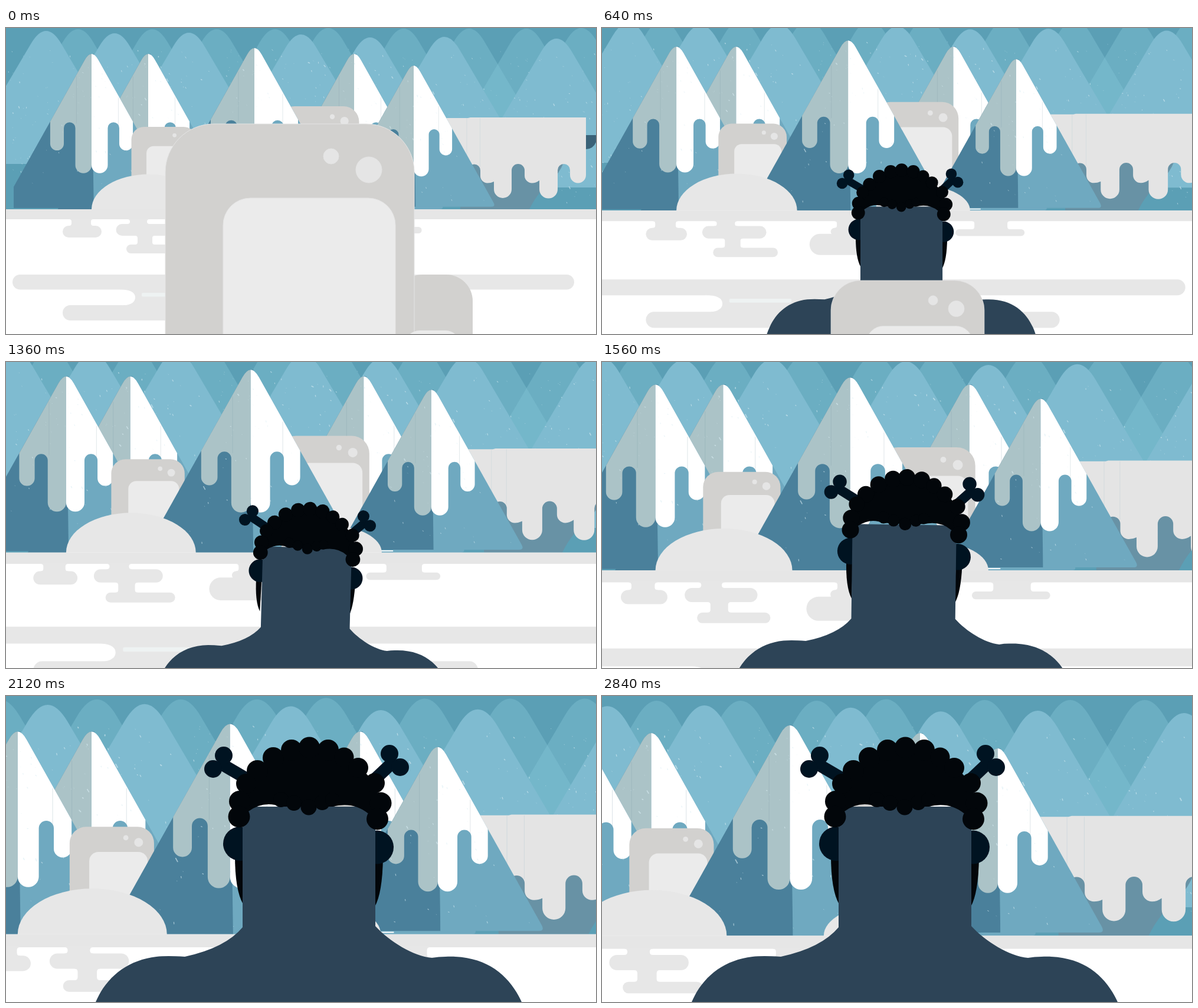
An HTML page that plays this animation: 1000x520 px, repeating every 2.88 s.

```html
<!DOCTYPE html>
<html lang="en">
<head>
<meta charset="utf-8">
<title>Snowy mountains</title>
<style>
  html, body { margin: 0; width: 100%; height: 100%; overflow: hidden; background: #fff; }
  svg { display: block; width: 100vw; height: 100vh; }
</style>
</head>
<body>
<svg id="stage" viewBox="0 0 1000 520" preserveAspectRatio="none"></svg>
<script>
const LOOP = 2880, STEP = 40;
const SKY = '#5b9fb5', HAZE = '#7fbbd0', SNOW = '#e7e7e7', ROCK = '#4a809b', ROCK_LIT = '#6fa9c0';
const SKIN = '#2d4457', NAVY = '#001321', HAIR = '#02060a';

// ---------- drawing helpers ----------
let seed = 17;
const rnd = () => (seed = (seed * 16807) % 2147483647) / 2147483647;
const path = (d, fill, extra = '') => `<path d="${d}" fill="${fill}" ${extra}/>`;
const rect = (x, y, w, h, fill, r = 0) =>
  `<rect x="${x}" y="${y}" width="${w}" height="${h}" rx="${r}" fill="${fill}"/>`;
const dot = (x, y, r, fill) => `<circle cx="${x}" cy="${y}" r="${r}" fill="${fill}"/>`;
const oval = (x, y, rx, ry, fill) => `<ellipse cx="${x}" cy="${y}" rx="${rx}" ry="${ry}" fill="${fill}"/>`;
const group = (inner, attr) => `<g ${attr}>${inner}</g>`;
const place = (x, y, k, inner) => group(inner, `transform="translate(${x} ${y}) scale(${k})"`);

function specks(count, pick) {
  const d = ['', '', ''];
  for (let i = 0; i < count; i++) {
    const [x, y] = pick();
    const size = rnd() < 0.07 ? 2 : rnd() < 0.4 ? 1 : 0;
    d[size] += `M${x.toFixed(1)} ${y.toFixed(1)}l${(rnd() * (size + .4)).toFixed(1)} ${(rnd() * size * 2 + .3).toFixed(1)}`;
  }
  return d.map((p, i) => path(p, 'none',
    `stroke="#d9edf3" stroke-linecap="round" stroke-width="${[0.7, 1, 1.4][i]}" opacity="${[0.5, 0.6, 0.6][i]}"`)).join('');
}

// Rounded peak: straight flanks of slope m, tip rounded over height h.
function peak(x, y, base, fill, alpha = 1, m = 1.7, h = 22) {
  const dx = 2 * h / m, w = (base - y + h) / m;
  return path(`M${x - w} ${base}L${x - dx} ${y + h}Q${x} ${y - h} ${x + dx} ${y + h}L${x + w} ${base}Z`,
    fill, `fill-opacity="${alpha}"`);
}

function mountain(x, y, k, base) {
  const b = (base - y) / k, w = (b + 11) / 1.79;
  const tip = 'M0 0Q-6.1 0 -12.3 11';
  const snow = tip + 'L-74 121.4V161a12.2 12.2 0 0 0 24.4 0V133a10.3 10.3 0 0 1 20.6 0V199.5a14.5 14.5 0 0 0 29 0Z';
  const flip = s => group(s, 'transform="scale(-1 1)"');
  const seam = 'fill="none" stroke="#7d9aa6" stroke-opacity=".28" stroke-width=".8"';
  return place(x, y, k,
    path(`${tip}L${-w} ${b}H4V0Z`, ROCK) +
    flip(path(`${tip}L${-w + 5} ${b - 9}Q${-w} ${b} ${-w + 9} ${b}H-4L0 0Z`, ROCK_LIT)) +
    path(snow, '#abc3c7') + flip(path(snow, '#fff')) +
    `<path d="M-27 40V125M48 78V128" ${seam}/>` +
    specks(45, () => {
      const v = 15 + rnd() * (b - 20);
      return [(rnd() * 2 - 1) * v / 1.9, v];
    }));
}

// Arched stone, origin at the middle of its top edge.
const stone = rect(-211, 0, 422, 545, '#d2d1cf', 82) + rect(-113, 126, 292, 430, '#ebebeb', 46) +
  dot(70, 55, 13, '#e5e5e5') + dot(134, 78, 22, '#e5e5e5');

const pill = (x1, x2, y1, y2) => rect(x1, y1, x2 - x1, y2 - y1, SNOW, (y2 - y1) / 2);
const neck = (a, b, y1, y2, r = 4) => path(
  `M${a - r} ${y1 - 1}V${y1}Q${a} ${y1} ${a} ${y1 + r}V${y2 - r}Q${a} ${y2} ${a - r} ${y2}V${y2 + 1}` +
  `H${b + r}V${y2}Q${b} ${y2} ${b} ${y2 - r}V${y1 + r}Q${b} ${y1} ${b + r} ${y1}V${y1 - 1}Z`, SNOW);

// ---------- landscape ----------
function landscape() {
  const far = [[122, 2], [248, 2], [357, 2], [456, 2], [546, 0], [674, 1], [785, 1], [882, 1], [975, 0]];
  const mid = [[184, 9], [310, 8], [500, 11], [617, 16], [743, 15], [933, 18]];
  return rect(-50, -50, 1150, 370, SKY) +
    far.map(([x, y]) => peak(x, y, 231, '#83c2d5', 0.4)).join('') +
    peak(68, 5, 231, HAZE) +
    mid.map(([x, y]) => peak(x, y, 271, HAZE)).join('') +
    specks(520, () => [rnd() * 1000, 36 + rnd() * 265]) +
    mountain(241, 44, 0.947, 308) + mountain(590, 44, 0.947, 308) +
    // snow shelf
    path('M770 160H960Q955 225 930 254Q900 280 887 308H770Z', '#6892a5') +
    path('M983 182H1003Q1000 206 983 206Z', '#3a6278') +
    path('M740 153H783L787 152H983V250a13.5 13.5 0 0 1 -27 0V241.5a10.5 10.5 0 0 0 -21 0V274a15.5 15.5 0 0 1 -31 0' +
      'V259Q898 263.5 891.5 263.5A12.5 12.5 0 0 1 879 251V242a11 11 0 0 0 -22 0V274a15 15 0 0 1 -30 0' +
      'V261Q822 263.5 816 263.5A12 12 0 0 1 804 251V242a10.5 10.5 0 0 0 -21 0V262H760Z', '#e4e4e4') +
    path('M781 153V225M803.5 153V236', 'none', 'stroke="#cdd8dc" stroke-width=".8" stroke-opacity=".8"') +
    mountain(145, 44, 0.947, 306) + rect(-50, 262, 63, 47, SKY) +
    place(267.4, 168, 0.26, stone) + place(530.5, 133, 0.322, stone) +
    mountain(421, 34, 1, 308) + mountain(691, 64, 0.88, 303.8) +
    rect(614, 304.7, 20, 1.6, '#fff') +
    oval(242, 308, 97, 59.5, SNOW) + oval(541, 308, 76, 40, SNOW) +
    // ground
    rect(-50, 308, 1150, 300, '#fff') + rect(-50, 308, 1150, 17, '#e6e6e6') +
    neck(111, 144, 325, 336) + pill(96, 162, 336, 356) +
    neck(210, 239, 325, 333) + pill(186.5, 289.6, 333, 353) +
    neck(223, 248, 353, 368) + pill(204, 308, 368, 383) +
    neck(403, 470, 325, 336) + pill(393, 490, 336, 348) + pill(359, 490, 345.4, 379.6) +
    neck(624, 677, 325, 338) + pill(593.6, 704.6, 338, 349) +
    pill(11, 963, 419, 444.5) + pill(96, 761, 471, 497) +
    path('M190 444H560V472H190Q219 472 219 458T190 444Z', SNOW) +
    rect(230, 450, 100, 6.5, '#eef2f2', 2);
}

// ---------- figure ----------
const bone = (ax, ay, bx, by, tx, ty) =>
  path(`M${(ax + bx) / 2} ${(ay + by) / 2}L${tx} ${ty}`, 'none', `stroke="${NAVY}" stroke-width="21"`) +
  dot(ax, ay, 15, NAVY) + dot(bx, by, 15, NAVY);

const headBack =
  path('M388 270Q388 330 402 354V270Z', HAIR) + path('M639 275Q638 335 625 358V275Z', HAIR) +
  dot(397, 251, 29, NAVY) + dot(628.5, 257, 28.5, NAVY) +
  bone(369, 101, 351, 124, 412, 143) + bone(650, 98, 668, 121, 614, 152);

const body = path('M401 188V393Q372 428 303 443Q272 441 255 443C205 449 170 478 152 520C135 555 125 620 125 660' +
  'H900C900 620 890 556 874 520C854 476 815 440 745 443Q733 443 722 445C690 442 650 417 626 391V188Z', SKIN);

const curls = [[453, 105, 18], [484, 92, 18], [514, 87.5, 18], [546, 92, 18], [573, 104, 16.5], [597, 122, 17],
  [426, 127, 18], [407, 149, 17], [625, 148, 17], [396, 179, 18], [395, 205, 18.5], [635, 182, 18.5], [629.5, 209, 18.5],
  [466, 176, 13], [488, 182, 13], [513, 189, 13.5], [536, 181, 13], [553, 176, 12]];
const hair = path('M392 205L400 150L426 120L484 88H546L597 118L628 150L635 209L613 199Q588 179 553 188H466Q437 177 411 196Z', HAIR) +
  curls.map(c => dot(...c, HAIR)).join('');

const stub = rect(180, 256, 130, 400, '#d2d1cf', 45);
const stubInner = rect(195, 351, 94, 300, '#ebebeb', 25);

const part = (id, inner) => group(inner, `id="${id}"`);
document.getElementById('stage').innerHTML =
  part('land', landscape()) + part('back', headBack) + part('body', body) + part('hair', hair) +
  part('front', stub + group(stone, 'stroke="#e4e4e4" stroke-width="1"') + stubInner);

// ---------- motion: time, scale, x, y, turn ----------
const camera = [[0, 1, 0, 0], [320, 1.0275, -13.6, -7.5], [960, 1.0815, -40, -21.6], [1160, 1.0984, -48.3, -26.3],
  [1360, 1.1335, -62.5, -25.3], [1760, 1.2545, -108, -1.7], [2120, 1.304, -169.3, 3.2], [2880, 1.305, -234.4, 5.6]];
const headKeys = [[0, .6184, 190, 187.3, 0], [1160, .6184, 190, 187.3, 0], [1360, .6695, 175.2, 171.6, 3.3],
  [1760, .899, 50.4, 53, 0], [2120, 1, 0, 0, 0], [2880, 1, 0, 0, 0]];
const bodyKeys = [[0, .6184, 190, 187.3, 0], [1160, .6184, 190, 187.3, 0], [1360, .6695, 170.4, 180.5, 1.5],
  [1760, .899, 50.4, 53.5, 0], [2120, 1, 0, 0, 0], [2880, 1, 0, 0, 0]];

// Smooth curve through the keys without overshoot.
function sample(keys, t) {
  let i = 0;
  while (i < keys.length - 2 && t >= keys[i + 1][0]) i++;
  const a = keys[i], b = keys[i + 1], span = b[0] - a[0], u = (t - a[0]) / span;
  return a.slice(1).map((from, n) => {
    const c = n + 1;
    const secant = j => (keys[j + 1][c] - keys[j][c]) / (keys[j + 1][0] - keys[j][0]);
    const slope = j => {
      if (j === 0) return secant(0);
      if (j === keys.length - 1) return secant(j - 1);
      const p = secant(j - 1), q = secant(j);
      return p * q <= 0 ? 0 : 2 * p * q / (p + q);
    };
    const u2 = u * u, u3 = u2 * u;
    return from * (2 * u3 - 3 * u2 + 1) + b[c] * (3 * u2 - 2 * u3) +
      span * (slope(i) * (u3 - 2 * u2 + u) + slope(i + 1) * (u3 - u2));
  });
}

const el = Object.fromEntries(['land', 'back', 'body', 'hair', 'front'].map(id => [id, document.getElementById(id)]));
const pose = (node, [k, x, y, turn = 0]) =>
  node.setAttribute('transform', `translate(${x} ${y}) scale(${k}) rotate(${turn})`);

function draw(t) {
  pose(el.land, sample(camera, t));
  const head = sample(headKeys, t);
  pose(el.back, head);
  pose(el.hair, head);
  pose(el.body, sample(bodyKeys, t));
  const u = Math.min(t / 320, 3);
  pose(el.front, [1 - 0.192 * u, 481 + 18.5 * u, 163 + 133 * u]);
}

const start = performance.now();
function tick() {
  const t = (performance.now() - start) % LOOP;
  draw(Math.floor(t / STEP) * STEP);
  requestAnimationFrame(tick);
}
tick();
</script>
</body>
</html>
```
